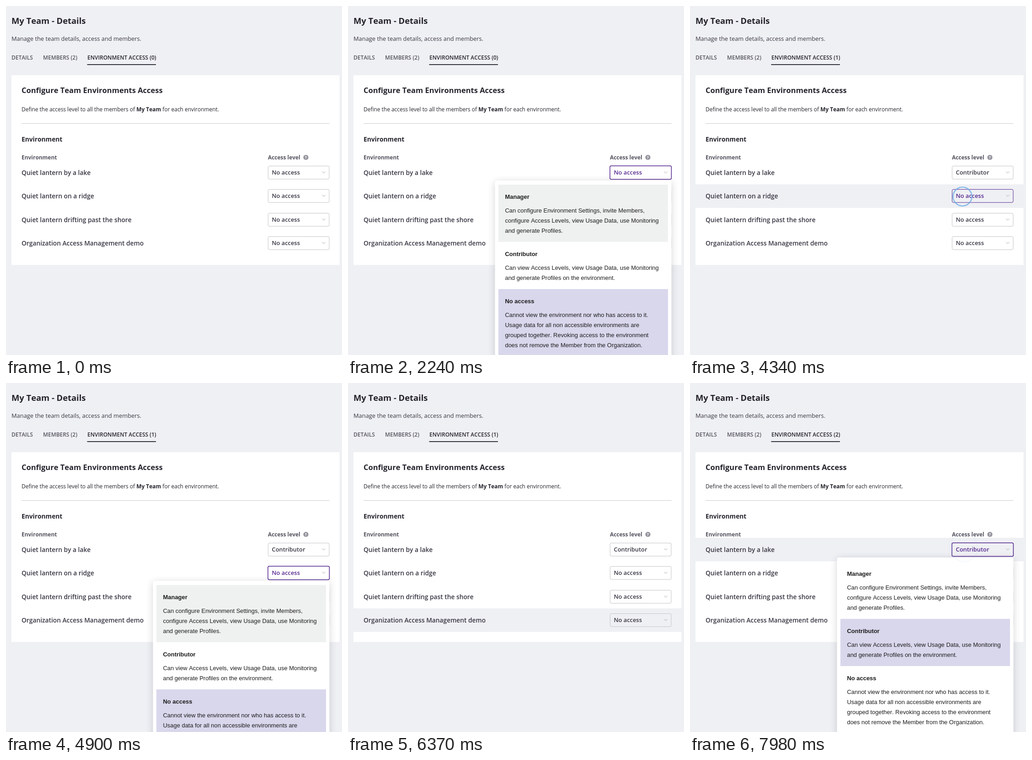
An HTML page with a canvas that plays this animation: 735 by 762 pixels, repeating every 8 s.

```html
<!DOCTYPE html>
<html lang="en">
<head>
<meta charset="utf-8">
<title>Team environment access</title>
<style>
  html, body { margin: 0; width: 100%; height: 100%; overflow: hidden; background: #eff0f4; }
  canvas { display: block; width: 735px; height: 762px; }
</style>
</head>
<body>
<canvas id="stage"></canvas>
<script>
const W = 735, H = 762, LOOP = 8000, STEP = 70;
const SANS = '"Open Sans", sans-serif';
const MENU_FONT = '"Liberation Sans", Arial, sans-serif';
const PAGE = '#eff0f4', INK = '#25232c', TEXT = '#383542', MUTED = '#55535f', PURPLE = '#54278f';
const ROW_TOP = 338, ROW_H = 51.4;

const rows = [
  'Quiet lantern by a lake',
  'Quiet lantern on a ridge',
  'Quiet lantern drifting past the shore',
  'Organization Access Management demo'
];

const options = [
  { name: 'Manager', top: 9, height: 125, lines: [
    'Can configure Environment Settings, invite Members,',
    'configure Access Levels, view Usage Data, use Monitoring',
    'and generate Profiles.'] },
  { name: 'Contributor', top: 134, height: 103, lines: [
    'Can view Access Levels, view Usage Data, use Monitoring',
    'and generate Profiles on the environment.'] },
  { name: 'No access', top: 237, height: 147, lines: [
    'Cannot view the environment nor who has access to it.',
    'Usage data for all non accessible environments are',
    'grouped together. Revoking access to the environment',
    'does not remove the Member from the Organization.'] }
];

const clicks = [
  { t: 1705, x: 631, y: 361 },
  { t: 2792, x: 506, y: 549 },
  { t: 4273, x: 596, y: 416 },
  { t: 6000, x: 502, y: 498 },
  { t: 7700, x: 599, y: 360 }
];

// Each entry holds from its time until the next one.
const hoveredRow = [[0, -1], [1050, 0], [1960, -1], [3640, 3], [3710, 2], [3780, 1],
  [4550, -1], [6160, 3], [7280, 1], [7420, 0]];
const hoveredOption = [[0, -1], [2030, 0], [2310, 1], [2870, -1], [4900, 0], [6090, -1]];
const focusedRow = [[0, -1], [1680, 0], [2870, -1], [4270, 1], [6090, -1], [7700, 0]];
const openMenu = [[0, -1], [1820, 0], [2870, -1], [4410, 1], [6090, -1], [7840, 0]];
const firstAccess = [[0, 'No access'], [3360, 'Contributor']];
const secondAccess = [[0, 'No access'], [6580, 'Manager']];

const canvas = document.getElementById('stage');
const ctx = canvas.getContext('2d');
const dpr = window.devicePixelRatio || 1;
canvas.width = W * dpr;
canvas.height = H * dpr;
ctx.fontKerning = 'none';

const entryAt = (track, t) => track.filter(entry => entry[0] <= t).pop();
const valueAt = (track, t) => entryAt(track, t)[1];

function text(str, x, y, size, weight = 400, color = INK, family = SANS) {
  ctx.font = `${weight} ${size}px ${family}`;
  ctx.fillStyle = color;
  ctx.fillText(str, x, y);
  return x + ctx.measureText(str).width;
}

function rect(x, y, w, h, color) {
  ctx.fillStyle = color;
  ctx.fillRect(x, y, w, h);
}

function roundRect(x, y, w, h, r) {
  ctx.beginPath();
  ctx.roundRect(x, y, w, h, r);
}

function drawHeader(count) {
  text('My Team - Details', 12, 38.5, 18.37, 700);
  text('Manage the team details, access and members.', 12, 76, 12.86, 400, TEXT);
  text('DETAILS', 12, 116.5, 11.94, 600, MUTED);
  text('MEMBERS (2)', 81, 116.5, 11.94, 600, MUTED);
  text(`ENVIRONMENT ACCESS (${count})`, 178, 116.5, 11.94, 600, INK);
  rect(177.5, 127, 150.5, 1.8, INK);
}

function drawCard() {
  rect(12, 151, 717.5, 414.5, '#fff');
  text('Configure Team Environments Access', 34, 190, 16.53, 700);
  let x = text('Define the access level to all the members of ', 34, 229.5, 11.94);
  x = text('My Team', x, 229.5, 11.94, 700);
  text(' for each environment.', x, 229.5, 11.94);
  rect(34, 256, 673.5, 1, '#c9c9cc');
  text('Environment', 34, 295.5, 13.78, 700);
}

function drawLabels() {
  text('Environment', 34, 335, 11.94, 700, MUTED);
  text('Access level', 573, 335, 11.94, 700, MUTED);
  ctx.beginPath();
  ctx.arc(656, 330.5, 5.6, 0, Math.PI * 2);
  ctx.fillStyle = '#97959f';
  ctx.fill();
  text('?', 653.8, 334, 9, 700, '#fff');
}

function drawSelect(top, value, focused, open) {
  const y = Math.round(top);
  const grow = open ? 0.4 : 0;
  roundRect(573.4 - grow, y + 0.4 - grow, 133.6 + 2 * grow, 28.6 + 2 * grow, 3);
  ctx.strokeStyle = focused ? PURPLE : '#c4c3c9';
  ctx.lineWidth = open ? 1.5 : 1;
  ctx.stroke();
  text(value, 581.5, y + 19, 12.86, 600, focused ? PURPLE : TEXT);
  ctx.beginPath();
  ctx.moveTo(691.5, y + 12.5);
  ctx.lineTo(695, y + 15.8);
  ctx.lineTo(698.5, y + 12.5);
  ctx.strokeStyle = '#aaa9b0';
  ctx.lineWidth = 1;
  ctx.stroke();
}

function drawRows(t, access) {
  const hovered = valueAt(hoveredRow, t);
  const focused = valueAt(focusedRow, t);
  const open = valueAt(openMenu, t);
  if (hovered >= 0) rect(12, ROW_TOP + hovered * ROW_H, 718, ROW_H, PAGE);
  drawLabels();
  rows.forEach((name, i) => {
    const top = ROW_TOP + i * ROW_H;
    text(name, 34, top + 31, 13.78, 600, TEXT);
    drawSelect(top + 11, access[i], i === focused, i === open);
  });
}

function drawMenu(t, access) {
  const [since, row] = entryAt(openMenu, t);
  if (row < 0) return;
  const top = Math.round(ROW_TOP + row * ROW_H + 43);
  const hovered = valueAt(hoveredOption, t);
  ctx.save();
  ctx.globalAlpha = Math.min(1, 0.5 + (t - since) / 140);
  ctx.shadowColor = 'rgba(40, 38, 55, 0.2)';
  ctx.shadowBlur = 16 * dpr;
  ctx.shadowOffsetY = 3 * dpr;
  roundRect(321.5, top, 386, 396, 4);
  ctx.fillStyle = '#fff';
  ctx.fill();
  ctx.shadowColor = 'transparent';
  options.forEach((option, i) => {
    const y = top + option.top;
    if (option.name === access[row]) rect(329, y, 371, option.height, '#d9d7ec');
    else if (i === hovered) rect(329, y, 371, option.height, '#eff1f0');
    text(option.name, 343.5, y + 30.5, 12.95, 700, '#1c1c1c', MENU_FONT);
    option.lines.forEach((line, n) =>
      text(line, 343.5, y + 61 + n * 22, 12.93, 400, '#1c1c1c', MENU_FONT));
  });
  ctx.restore();
}

function drawClicks(t) {
  for (const { t: start, x, y } of clicks) {
    const age = t - start;
    if (age < 0 || age > 290) continue;
    ctx.beginPath();
    ctx.arc(x, y, 17.5 + age * 0.045, 0, Math.PI * 2);
    ctx.strokeStyle = `rgba(110, 172, 232, ${0.8 * (1 - (age / 290) ** 2)})`;
    ctx.lineWidth = 2.6;
    ctx.stroke();
  }
}

function draw(now) {
  const t = Math.floor((now % LOOP) / STEP) * STEP;
  const access = [valueAt(firstAccess, t), valueAt(secondAccess, t), 'No access', 'No access'];
  ctx.setTransform(dpr, 0, 0, dpr, 0, 0);
  rect(0, 0, W, H, PAGE);
  drawHeader(access.filter(level => level !== 'No access').length);
  drawCard();
  drawRows(t, access);
  drawMenu(t, access);
  drawClicks(t);
}

const start = performance.now();
function tick() {
  draw(performance.now() - start);
  requestAnimationFrame(tick);
}
tick();
</script>
</body>
</html>
```
